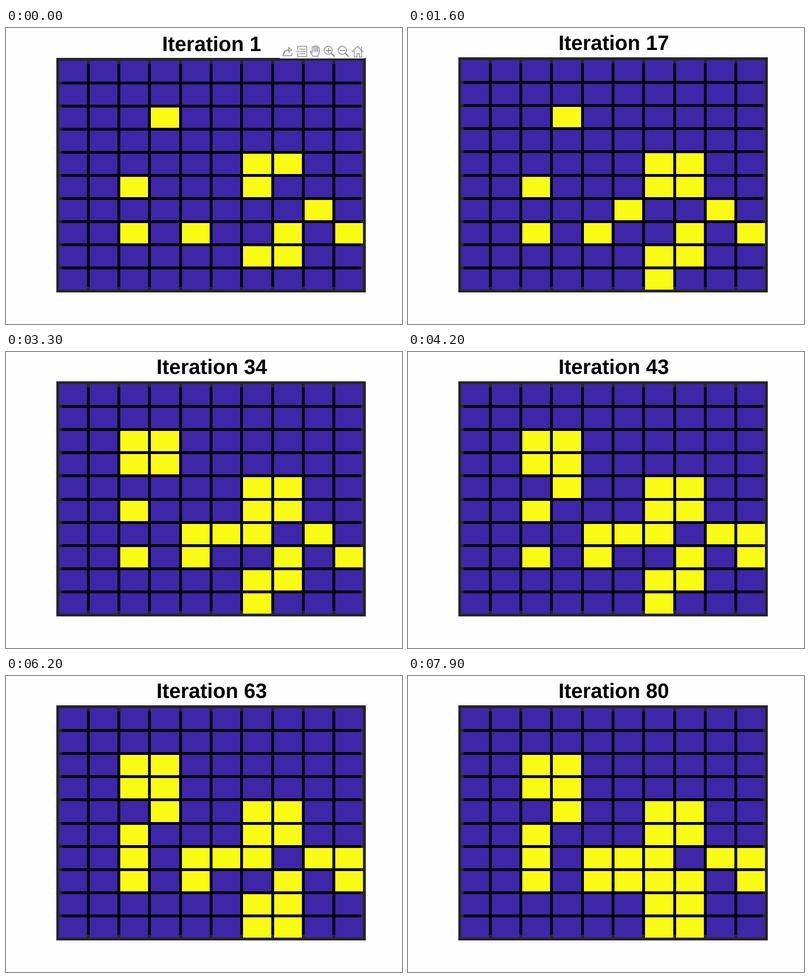
These frames come from a looping animation (700 by 525 pixels, 8 s). A matplotlib script:

```python
import math

import numpy as np
import matplotlib.pyplot as plt
from matplotlib.animation import FuncAnimation

W, H, DPI = 700, 525, 100
PX = 72 / DPI
FRAMES, STEP = 80, 100

PAPER = (254, 254, 254)
BLUE = (62, 38, 168)
YELLOW = (249, 251, 21)
EDGE = (38, 38, 38)
ICON = "#8c8c8c"

LEFT, RIGHT, BOTTOM = 89, 636, 469
LINE = 5                # frame and grid line width
REACH = 2 * LINE        # frame plus tick

# Cells are written as two digits: row, column.
START = (23, 46, 47, 52, 56, 68, 72, 74, 77, 79, 86, 87)

# Growth comes in waves: first step of the wave -> cells joining in turn.
WAVES = {2: (57, 65, 96),
         20: (22, 32),
         28: (33, 64, 66, 69, 43),
         58: (62, 97, 75, 76)}
BEAT = 2.5              # steps between two cells of a wave

plt.rcParams["text.hinting"] = "none"
fig = plt.figure(figsize=(W / DPI, H / DPI), dpi=DPI)
ax = fig.add_axes([0, 0, 1, 1])
ax.set_axis_off()


def lit_cells(n):
    grown = {cell for first, cells in WAVES.items()
             for k, cell in enumerate(cells) if first + BEAT * k <= n}
    return grown.union(START)


def edges(origin, pitch, first, last):
    """Pixel where each cell begins, plus the outer end."""
    return [first] + [int(origin + pitch * k) for k in range(1, 10)] + [last]


def paint(n):
    """Pixel picture of the board at step n."""
    opening = n == 0
    top = 53 if opening else 52
    pitch = 41.1 if opening else 41.2
    xs = edges(94, 54.3, LEFT + LINE, RIGHT)
    ys = edges(428.9 - 9 * pitch, pitch, top + LINE, BOTTOM)

    img = np.full((H, W, 3), PAPER, np.uint8)
    img[top:BOTTOM, LEFT:RIGHT] = EDGE
    img[top + LINE:BOTTOM - LINE, LEFT + LINE:RIGHT - LINE] = 0

    lit = lit_cells(n)
    for r in range(10):
        for c in range(10):
            img[ys[r]:ys[r + 1] - LINE, xs[c]:xs[c + 1] - LINE] = \
                YELLOW if 10 * r + c in lit else BLUE

    for x, y in zip(xs[1:10], ys[1:10]):
        img[top:top + REACH + 1, x - LINE:x] = EDGE
        img[BOTTOM - REACH:BOTTOM, x - LINE:x] = EDGE
        img[y - LINE:y, LEFT:LEFT + REACH] = EDGE
        img[y - LINE:y, RIGHT - REACH + 1:RIGHT] = EDGE

    if opening:         # toolbar backdrop
        img[28:54, 484:634] = PAPER
    return img


board = ax.imshow(paint(0), extent=(0, W, H, 0), interpolation="nearest",
                  aspect="auto")
ax.set_xlim(0, W)
ax.set_ylim(H, 0)
title = ax.text(0, 0, "", family="Liberation Sans", weight="bold",
                size=26.4, color="black", ha="left", va="baseline")

toolbar = []


def stroke(*pts, width=1.4):
    x, y = zip(*pts)
    toolbar.extend(ax.plot(x, y, color=ICON, lw=width * PX,
                           solid_joinstyle="round"))


def arc(x, y, rx, ry, a0=0, a1=360):
    angles = (math.radians(a) for a in np.linspace(a0, a1, 25))
    return [(x + rx * math.cos(a), y + ry * math.sin(a)) for a in angles]


def export_icon(x, y):
    stroke((x - 5, y + 3), (x - 8, y + 8), (x + 7, y + 8), (x + 9, y + 4))
    stroke(*arc(x + 3, y + 5, 9, 7, 180, 270), width=2)
    stroke((x + 3, y - 6), (x + 8, y - 2), (x + 3, y + 2), (x + 3, y - 6))


def note_icon(x, y):
    stroke((x - 8, y - 3), (x - 8, y - 9), (x + 8, y - 9), (x + 8, y + 9),
           (x - 8, y + 9), (x - 8, y + 3))
    stroke((x - 10, y), (x - 6, y))
    for dy in (-4, 0, 4):
        stroke((x - 4, y + dy), (x + 5, y + dy))


def hand_icon(x, y):
    for k in range(4):
        fx = x - 3.5 + 3.2 * k
        tip = y - 8 + (k - 1.3) ** 2
        stroke((fx - 1.6, y + 1), *arc(fx, tip, 1.6, 1.6, 180, 360),
               (fx + 1.6, y))
    stroke((x - 5, y + 3), (x - 8, y), (x - 8.5, y + 2), (x - 4, y + 9),
           (x + 5, y + 9), (x + 7.7, y))


def lens_icon(x, y, plus):
    stroke(*arc(x, y, 7.2, 7.2))
    stroke((x + 5.2, y + 5.2), (x + 10.5, y + 10.5), width=2.2)
    stroke((x - 4, y), (x + 4, y), width=1.6)
    if plus:
        stroke((x, y - 4), (x, y + 4), width=1.6)


def home_icon(x, y):
    stroke((x - 9.5, y + 1), (x, y - 8.5), (x + 9.5, y + 1))
    for side in (-1, 1):
        stroke((x + 6.5 * side, y - 1), (x + 6.5 * side, y + 9.5),
               (x + 2 * side, y + 9.5), (x + 2 * side, y + 3.5),
               (x, y + 3.5))
    stroke((x + 6, y - 3), (x + 6, y - 8))


export_icon(497, 41)
note_icon(522.5, 41)
hand_icon(546.5, 41)
lens_icon(569.5, 39.5, True)
lens_icon(594.5, 39.5, False)
home_icon(621.5, 41)


def update(n):
    label = str(n + 1)
    board.set_data(paint(n))
    title.set_text("Iteration " + label)
    # each extra digit moves the start left by half its width
    title.set_position((286 - 10 * len(label), 42 if n == 0 else 40))
    for part in toolbar:
        part.set_visible(n == 0)
    return [board, title, *toolbar]


anim = FuncAnimation(fig, update, frames=FRAMES, interval=STEP, repeat=True,
                     repeat_delay=0, blit=False)
plt.show()
```
